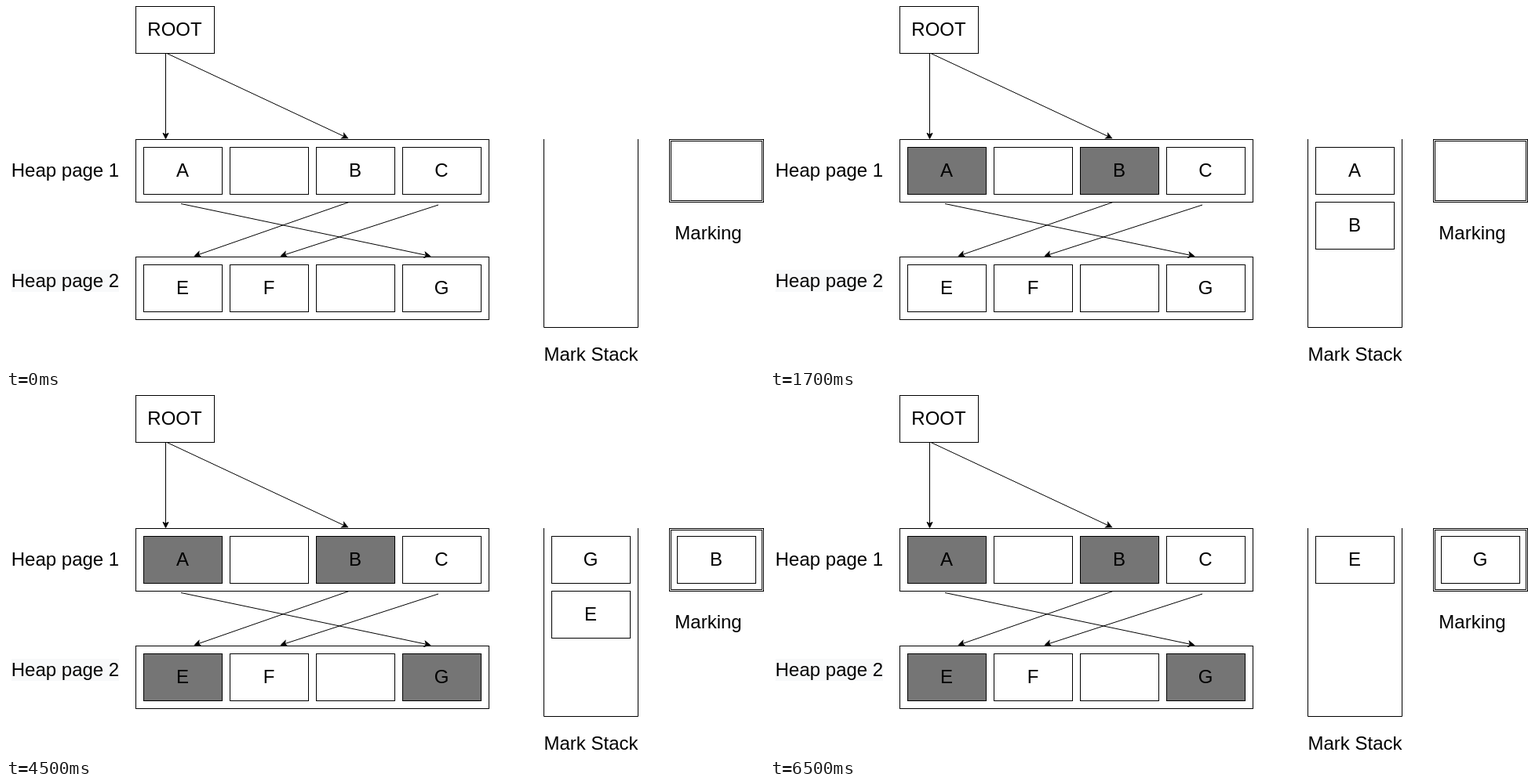
Recreate the animation shown at these times as an HTML page. Size 966 by 461 pixels, loop 8000 ms.

```html
<!DOCTYPE html>
<html>
<head>
<meta charset="utf-8">
<title>Mark stack</title>
<style>
  html, body { margin: 0; width: 100%; height: 100%; overflow: hidden; background: #fff; }
  svg { display: block; }
  text { font: 24px "Liberation Sans", Arial, sans-serif; text-anchor: middle; }
  rect, .line { fill: #fff; stroke: #000; }
  .line { fill: none; }
</style>
</head>
<body>
<svg width="966" height="461" viewBox="0 0 966 461"></svg>
<script>
const svg = document.querySelector('svg');

function add(tag, attrs, label = '') {
  const el = document.createElementNS('http://www.w3.org/2000/svg', tag);
  for (const key in attrs) el.setAttribute(key, attrs[key]);
  el.textContent = label;
  return svg.appendChild(el);
}

const box = (x, y, width, height) => add('rect', { x: x + .5, y: y + .5, width, height });
const line = d => add('path', { d, class: 'line' });
const text = (x, midY, label) => add('text', { x, y: midY + 8 }, label);

function cell(x, y, label = '') {
  return { rect: box(x, y, 100, 60), text: text(x + 50, y + 30, label) };
}

function fill(slot, label = '') {
  slot.text.textContent = label;
  slot.rect.style.display = label ? '' : 'none';
}

function arrow(x1, y1, x2, y2) {
  const angle = Math.atan2(y2 - y1, x2 - x1) * 180 / Math.PI;
  const length = Math.hypot(x2 - x1, y2 - y1);
  line(`M${x1} ${y1}L${x2} ${y2}`).setAttribute('stroke-dasharray', `${length - 5.25} 99`);
  add('path', {
    d: 'M0 0L-7 3.5L-5.25 0L-7 -3.5Z', stroke: '#000',
    transform: `translate(${x2} ${y2}) rotate(${angle})`
  });
}

// Fixed diagram
box(165, 0, 100, 60);
text(215, 30, 'ROOT');
text(75.5, 210, 'Heap page 1');
add('rect', { x: 7, y: 337, width: 137, height: 28, style: 'fill:#f8f9fa;stroke:none' });
text(75.5, 351, 'Heap page 2');

const heap = {};
['A BC', 'EF G'].forEach((page, row) => {
  const y = 170 + row * 150;
  box(165, y, 450, 80);
  [...page].forEach((name, i) => {
    const slot = cell(175 + i * 110, y + 10, name.trim());
    if (name !== ' ') heap[name] = slot;
  });
});

arrow(203.5, 60.5, 203.5, 169.4);
arrow(205, 60.5, 435.5, 168.7);
arrow(223, 252.5, 540.5, 319.3);
arrow(437, 250.5, 240.5, 319.2);
arrow(551, 254, 350.5, 319.2);

line('M685.5 170V410.5H805.5V170');
text(745.5, 445, 'Mark Stack');
box(845, 170, 120, 80);
box(847, 172, 116, 76);
text(895, 290, 'Marking');

// Changing slots
const stack = [cell(695, 180), cell(695, 250)];
const current = cell(855, 180);

const steps = [
  { at: 0, marked: '', queue: '', active: '' },
  { at: 500, marked: 'AB', queue: 'AB', active: '' },
  { at: 2500, marked: 'ABG', queue: 'BG', active: 'A' },
  { at: 4500, marked: 'ABGE', queue: 'GE', active: 'B' },
  { at: 6500, marked: 'ABGE', queue: 'E', active: 'G' }
];
let shown;

function show(step) {
  for (const name in heap)
    heap[name].rect.style.fill = step.marked.includes(name) ? '#757575' : '#fff';
  stack.forEach((slot, i) => fill(slot, step.queue[i]));
  fill(current, step.active);
  shown = step;
}

function frame() {
  const time = performance.now() % 8000;
  const step = steps.findLast(s => s.at <= time);
  if (step !== shown) show(step);
  requestAnimationFrame(frame);
}
frame();
</script>
</body>
</html>
```
